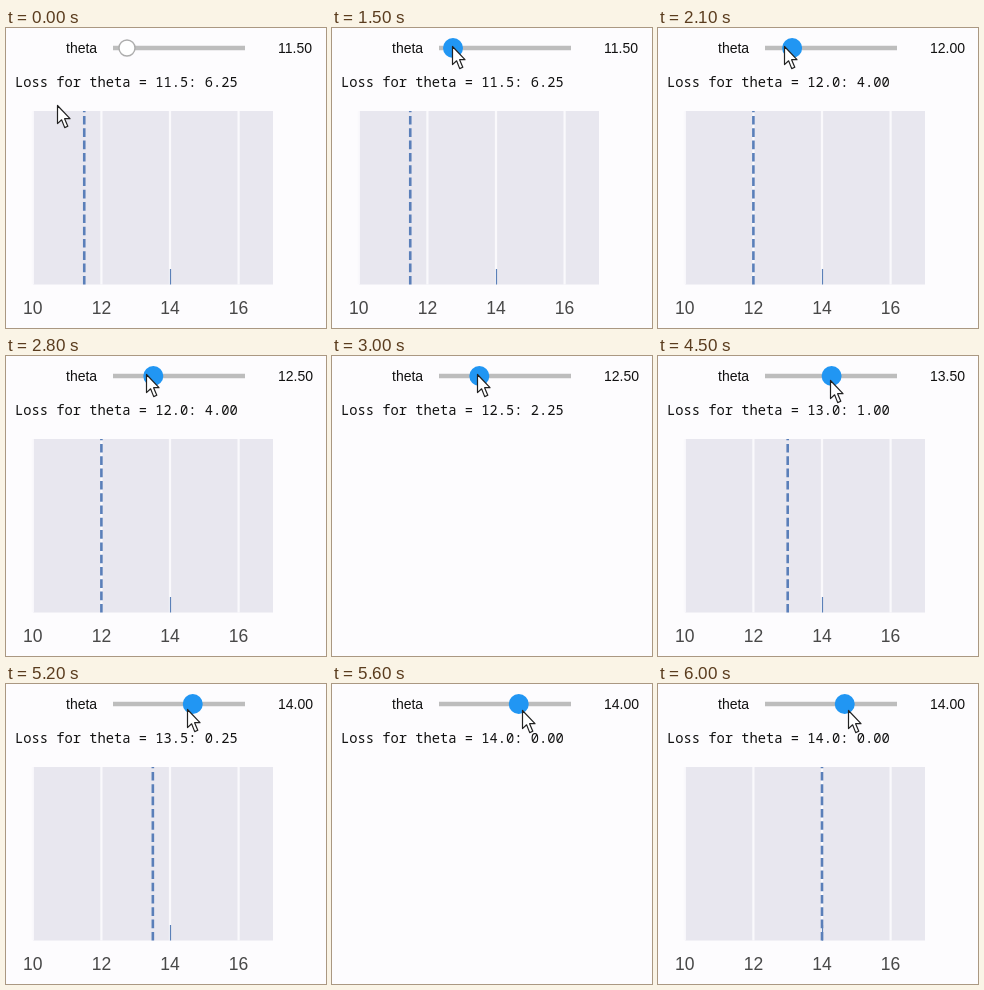
An HTML page for the animation above (6.1 s loop, 320x300 px).

```html
<!DOCTYPE html>
<html lang="en">
<head>
<meta charset="utf-8">
<style>
  html, body { margin: 0; width: 100%; height: 100%; overflow: hidden; background: #fdfcfe; }
  svg { display: block; width: 320px; height: 300px; }
  text { font: 14px "Liberation Sans", Arial, sans-serif; fill: #111; white-space: pre; }
  #loss { font: 13.75px "Noto Sans Mono", monospace; }
  #plot text { font-size: 17.5px; fill: #484848; text-anchor: middle; }
</style>
</head>
<body>
<svg viewBox="0 0 320 300">
  <text x="60" y="25">theta</text>
  <path d="M107 20H239" stroke="#bdbdbd" stroke-width="4.4"/>
  <circle id="handle" cy="20"/>
  <text id="value" x="272" y="25"></text>
  <text id="loss" x="9" y="58.5"></text>
  <g id="plot">
    <rect x="27" y="83" width="240" height="173.5" fill="#e8e7ef"/>
    <g id="grid"></g>
    <path d="M164.5 256.5V241" stroke="#5b80b8" stroke-width="1.2"/>
    <path id="marker" d="M0 256.5V83" stroke="#5a7fb9" stroke-width="2.6" stroke-dasharray="8.6 3.7"/>
  </g>
  <path id="cursor" d="M.5 .5V18.6L4.6 14.8L7.7 22.6L10.8 21.2L7.6 13.7H13Z"
        fill="#fff" stroke="#222" stroke-width="1.2" stroke-linejoin="round"/>
</svg>
<script>
const LOOP = 6100, TICK = 100;
const $ = id => document.getElementById(id);
const plotX = theta => 26.8 + 34.3 * (theta - 10);
const sliderX = theta => 121 + 26.3 * (theta - 11.5);

// Times at which each part steps on by 0.5 from 11.5
const handleSteps = [2000, 2800, 3600, 4400, 5200];
const lossSteps = [2100, 2900, 3700, 4600, 5500];
const plotSteps = [2100, 3100, 3800, 4700, 5900];
const blanks = [[2900, 3100], [5500, 5900]];

// Pointer tip: time, x, y
const pointer = [
  [0, 51, 77], [600, 120, 18], [1900, 120, 18], [2100, 126, 18], [2500, 133, 18],
  [3000, 145, 18], [3200, 148, 18], [3400, 148, 18], [4000, 162, 22], [4300, 162, 22],
  [4500, 172, 24], [4900, 177, 24], [5100, 177, 24], [5200, 181, 25], [5400, 181, 25],
  [5600, 190, 26], [LOOP, 190, 26]
];

const thetaAt = (steps, t) => 11.5 + steps.filter(s => t >= s).length / 2;

function pointerAt(t) {
  const i = pointer.findIndex(p => p[0] > t);
  const [a, b] = [pointer[i - 1], pointer[i]];
  const k = (t - a[0]) / (b[0] - a[0]);
  return [1, 2].map(n => Math.round(a[n] + k * (b[n] - a[n])));
}

function setAttrs(id, attrs) {
  for (const name in attrs) $(id).setAttribute(name, attrs[name]);
}

$("grid").innerHTML = [10, 12, 14, 16].map(v =>
  `<path d="M${plotX(v)} 83V256.5" stroke="#faf9fc" stroke-width="2.2"/>
   <text x="${plotX(v)}" y="286">${v}</text>`).join("");

function draw(now) {
  const t = Math.floor(now % LOOP / TICK) * TICK;
  const slider = thetaAt(handleSteps, t);
  const theta = thetaAt(lossSteps, t);
  const hover = t >= 500;

  setAttrs("handle", {
    cx: sliderX(slider), r: hover ? 10 : 8,
    fill: hover ? "#2196f3" : "#fff",
    stroke: hover ? "none" : "#adadad", "stroke-width": 1.4
  });
  $("value").textContent = slider.toFixed(2);
  $("loss").textContent = `Loss for theta = ${theta.toFixed(1)}: ${((14 - theta) ** 2).toFixed(2)}`;
  $("plot").style.display = blanks.some(([a, b]) => t >= a && t < b) ? "none" : "";
  setAttrs("marker", { transform: `translate(${plotX(thetaAt(plotSteps, t))})` });
  setAttrs("cursor", { transform: `translate(${pointerAt(t)})` });
}

const start = performance.now();
function frame() {
  draw(performance.now() - start);
  requestAnimationFrame(frame);
}
frame();
</script>
</body>
</html>
```
